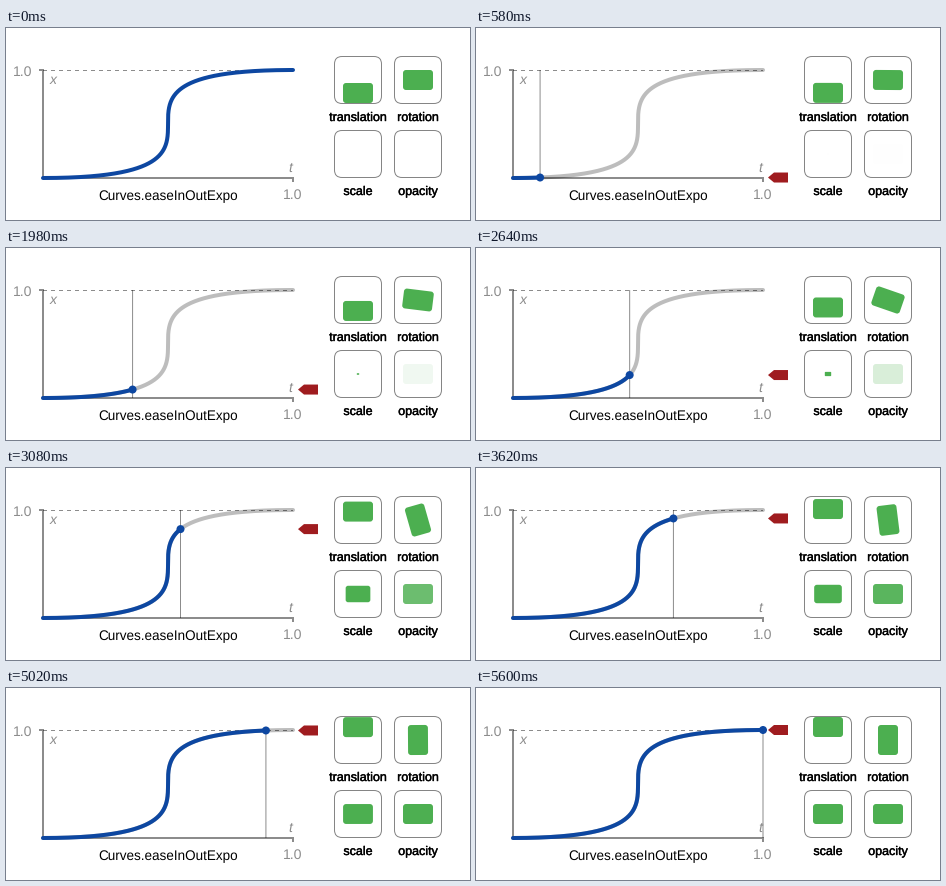
Animation, 464 px wide and 192 px high, one loop 5.62 s. Source, as a matplotlib script:

```python
import numpy as np
import matplotlib.pyplot as plt
from matplotlib import patheffects
from matplotlib.animation import FuncAnimation
from matplotlib.patches import Circle, FancyBboxPatch, Polygon
from matplotlib.transforms import Affine2D

W, H, DPI = 464, 192, 64
PX = 72 / DPI
TICK = 20
FRAMES = 281
STEPS = 120

LEFT, RIGHT, TOP, BOTTOM = 37, 287, 42, 150
BLUE, GREEN, RED = "#0d47a1", "#4caf50", "#9f1c1f"
AXIS = (0, 0, 0, 0.45)
FADED = (0, 0, 0, 0.26)

plt.rcParams.update({
    "font.family": "Liberation Sans",
    "text.hinting": "none",
    "path.snap": False,
    "toolbar": "None",
})

fig = plt.figure(figsize=(W / DPI, H / DPI), dpi=DPI, facecolor="white")
ax = fig.add_axes([0, 0, 1, 1])
ax.set_xlim(0, W)
ax.set_ylim(H, 0)
ax.axis("off")


def line(xs, ys, color, width, **kw):
    return ax.plot(xs, ys, color=color, lw=width * PX, **kw)[0]


def text(x, y, label, size, color="black", ha="center", **kw):
    return ax.text(x, y, label, size=size * PX, color=color, ha=ha,
                   va="baseline", **kw)


def rounded(x, y, w, h, r, **kw):
    style = f"round,pad=0,rounding_size={r}"
    return ax.add_patch(FancyBboxPatch((x, y), w, h, boxstyle=style, **kw))


# Cubic ease with control points (1, 0) and (0, 1)
s = np.linspace(0, 1, 601)
curve_t = 3 * (1 - s) ** 2 * s + s ** 3
curve_v = 3 * (1 - s) * s ** 2 + s ** 3


def to_x(t):
    return LEFT + t * (RIGHT - LEFT)


def to_y(v):
    return BOTTOM - v * (BOTTOM - TOP)


# Chart
line([LEFT - 4, LEFT, LEFT, RIGHT, RIGHT],
     [TOP, TOP, BOTTOM, BOTTOM, BOTTOM + 4], AXIS, 2,
     solid_capstyle="butt", solid_joinstyle="miter", zorder=1)
for x in range(LEFT, RIGHT, 8):
    line([x, min(x + 4, RIGHT)], [TOP + 0.5] * 2, AXIS, 1,
         solid_capstyle="butt", zorder=1)

text(17, 48, "1.0", 14, AXIS)
text(287, 170.5, "1.0", 14, AXIS)
text(43.5, 56, "x", 14, AXIS, ha="left", style="italic")
text(284.3, 144, "t", 14, AXIS, style="italic")
text(162, 172, "Curves.easeInOutExpo", 13.55)

round_ends = dict(solid_capstyle="round", solid_joinstyle="round")
full = line(to_x(curve_t), to_y(curve_v), BLUE, 4, zorder=2, **round_ends)
cursor = line([], [], AXIS, 1, solid_capstyle="butt", zorder=3)
done = line([], [], BLUE, 4, zorder=4, **round_ends)
dot = ax.add_patch(Circle((0, 0), 4, fc=BLUE, lw=0, zorder=5))
arrow = ax.add_patch(Polygon([(0, 0)], fc=RED, lw=0, zorder=5))
running = (cursor, done, dot, arrow)

# Tiles
SIZE = 48
centers = {
    "translation": (352, 52),
    "rotation": (412, 52),
    "scale": (352, 126),
    "opacity": (412, 126),
}
boxes = {}
for name, (cx, cy) in centers.items():
    rounded(cx - SIZE / 2 + 0.5, cy - SIZE / 2 + 0.5, SIZE - 1, SIZE - 1, 7.5,
            fc="none", ec="#858585", lw=PX, zorder=2)
    boxes[name] = rounded(-15, -10, 30, 20, 3, fc=GREEN, lw=0, zorder=3)
    label = text(cx, cy + 41, name, 12.5)
    label.set_path_effects([
        patheffects.withStroke(linewidth=0.4 * PX, foreground="black")])


def place(name, move):
    move.translate(*centers[name])
    boxes[name].set_transform(move + ax.transData)


def step_at(tick):
    """Steps advance in groups of three, held for 100, 20 and 20 ms."""
    if tick == 0:
        return 0
    group, phase = divmod(tick - 1, 7)
    return 1 + 3 * group + max(0, phase - 4)


def update(tick):
    step = step_at(tick)
    t = step / STEPS
    k = np.interp(t, curve_t, s)
    v = 3 * (1 - k) * k ** 2 + k ** 3
    x, y = to_x(t), to_y(v)

    full.set_color(FADED if step else BLUE)
    for part in running:
        part.set_visible(step > 0)
    past = s < k
    done.set_data(to_x(np.append(curve_t[past], t)),
                  to_y(np.append(curve_v[past], v)))
    cursor.set_data([x, x], [TOP, BOTTOM])
    dot.center = x, y
    arrow.set_xy([(292, y), (298, y - 5), (312, y - 5),
                  (312, y + 5), (298, y + 5)])

    place("translation", Affine2D().translate(0, 13 - 26 * v))
    place("rotation", Affine2D().rotate_deg(90 * v))
    place("scale", Affine2D().scale(max(v, 1e-4)))
    place("opacity", Affine2D())
    boxes["scale"].set_visible(v > 1e-4)
    boxes["opacity"].set_alpha(min(max(v, 0), 1))
    return ()


anim = FuncAnimation(fig, update, frames=FRAMES, interval=TICK,
                     init_func=lambda: update(0), repeat=True,
                     repeat_delay=0, blit=False)
plt.show()
```
